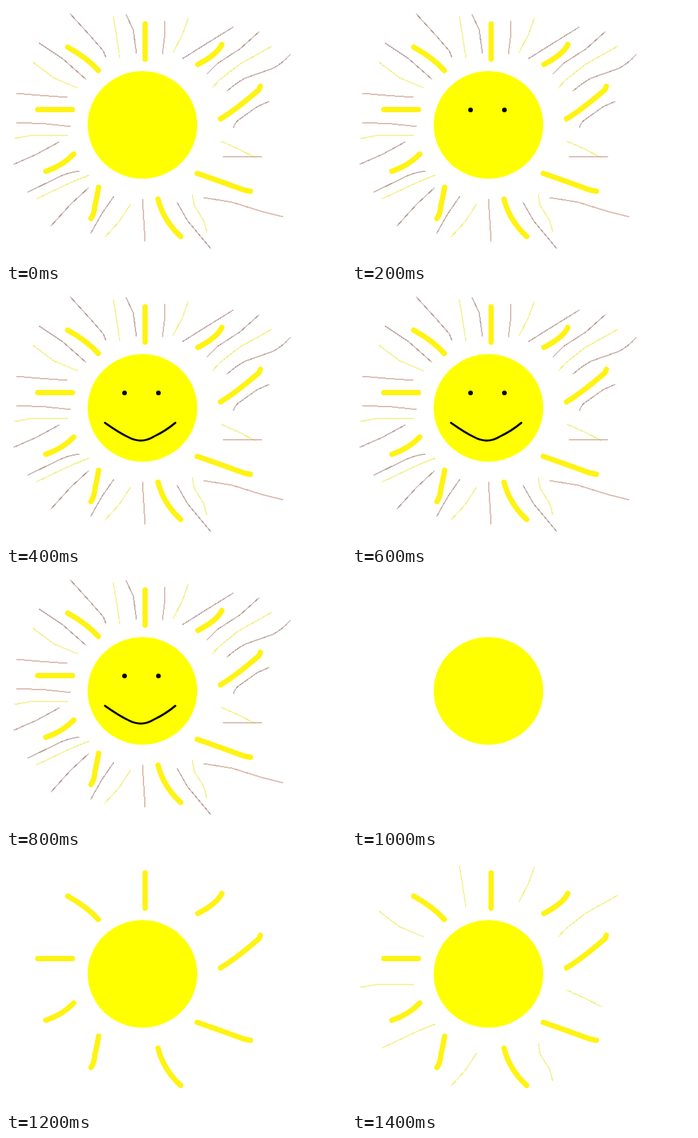
These frames come from a looping animation (512 px wide and 384 px high, 1.6 s). An HTML page:

```html
<!DOCTYPE html>
<html lang="en">
<head>
<meta charset="utf-8">
<title>Smiling sun</title>
<style>
  html, body { margin: 0; width: 100%; height: 100%; overflow: hidden; background: #fff; }
  svg { display: block; width: 100vw; height: 100vh; }
  path { fill: none; stroke-linecap: round; stroke-linejoin: round; }

  .disc { fill: #ff0; }
  .beams path { stroke: #fff312; stroke-width: 8; }
  .hair path { stroke-width: 1; shape-rendering: crispEdges; }
  .gold { stroke: #e6e63c; }
  .dusk { stroke: #947068; }
  .rust { stroke: #b97a62; }
  .mouth { stroke: #000; stroke-width: 3; }

  /* each part switches on and off in 200 ms steps */
  .beams, .hair, .eyes, .mouth { animation: 1600ms step-end infinite; }
  .beams { animation-name: beams; }
  .gold  { animation-name: gold; }
  .brown { animation-name: brown; }
  .eyes  { animation-name: eyes; }
  .mouth { animation-name: mouth; }

  @keyframes beams { 0%, 75%, 100% { opacity: 1 } 62.5% { opacity: 0 } }
  @keyframes gold  { 0%, 87.5%, 100% { opacity: 1 } 62.5% { opacity: 0 } }
  @keyframes brown { 0%, 100% { opacity: 1 } 62.5% { opacity: 0 } }
  @keyframes eyes  { 0%, 62.5%, 100% { opacity: 0 } 12.5% { opacity: 1 } }
  @keyframes mouth { 0%, 62.5%, 100% { opacity: 0 } 25% { opacity: 1 } }
</style>
</head>
<body>
<svg viewBox="0 0 512 384">
  <ellipse class="disc" cx="205.5" cy="179" rx="82.5" ry="81"/>

  <g class="beams">
    <path d="M209.5 27V80"/>
    <path d="M289 88Q318 73 325 58"/>
    <path d="M323 170Q345 157 381 126L383 121"/>
    <path d="M288 252L325 265L358 277L368 279"/>
    <path d="M229 291Q237 323 263 347"/>
    <path d="M139.500 273Q137 288 134 300Q133 313 128 320"/>
    <path d="M102 223Q86 240 60 249"/>
    <path d="M100 156H48"/>
    <path d="M139 97Q122 78 93 62"/>
  </g>

  <g class="hair gold" transform="translate(.5 .5)">
    <path d="M161 15L166 45L171 78"/>
    <path d="M274 18L265 43L251 70"/>
    <path d="M400 60L350 88L321 111L310 123"/>
    <path d="M323 203L350 215L375 228"/>
    <path d="M280 283L283 300L297 322L302 340"/>
    <path d="M187 298L170 324L148 348"/>
    <path d="M125 254L100 264L45 290"/>
    <path d="M93 194H40L12 199"/>
    <path d="M108 123L72 108L40 84"/>
  </g>

  <g class="hair brown" transform="translate(.5 .5)">
    <g class="dusk">
      <path d="M96 11L126 44L146 67L150 77"/>
      <path d="M180 12L191 35L196 71"/>
      <path d="M265 79L300 57L342 31"/>
      <path d="M302 102L318 86L352 64L381 38"/>
      <path d="M332 128Q345 116 360 108L400 94Q415 87 428 72"/>
      <path d="M342 183Q344 174 354 168L378 151L396 143"/>
      <path d="M257 295L273 323L308 365"/>
      <path d="M162 286L144 312L127 342"/>
      <path d="M124 273L97 298L67 331"/>
      <path d="M110 248Q92 250 75 259L32 280"/>
      <path d="M80 204L45 223L11 238"/>
      <path d="M120 110L85 79L49 55"/>
    </g>
    <g class="rust">
      <path d="M238 22V48L235 72"/>
      <path d="M326 226H385"/>
      <path d="M297 288L340 295L385 309L417 317"/>
      <path d="M205 290L207 322L209 354"/>
      <path d="M97 181L60 177L15 175"/>
      <path d="M92 137L50 134L15 131"/>
    </g>
  </g>

  <g class="eyes">
    <circle cx="178.500" cy="156.500" r="3.500"/>
    <circle cx="229.500" cy="156.500" r="3.500"/>
  </g>
  <path class="mouth" d="M149 201.500Q171 217 184 223Q204 234 223 222Q240 214 255 201.500"/>
</svg>
</body>
</html>
```
